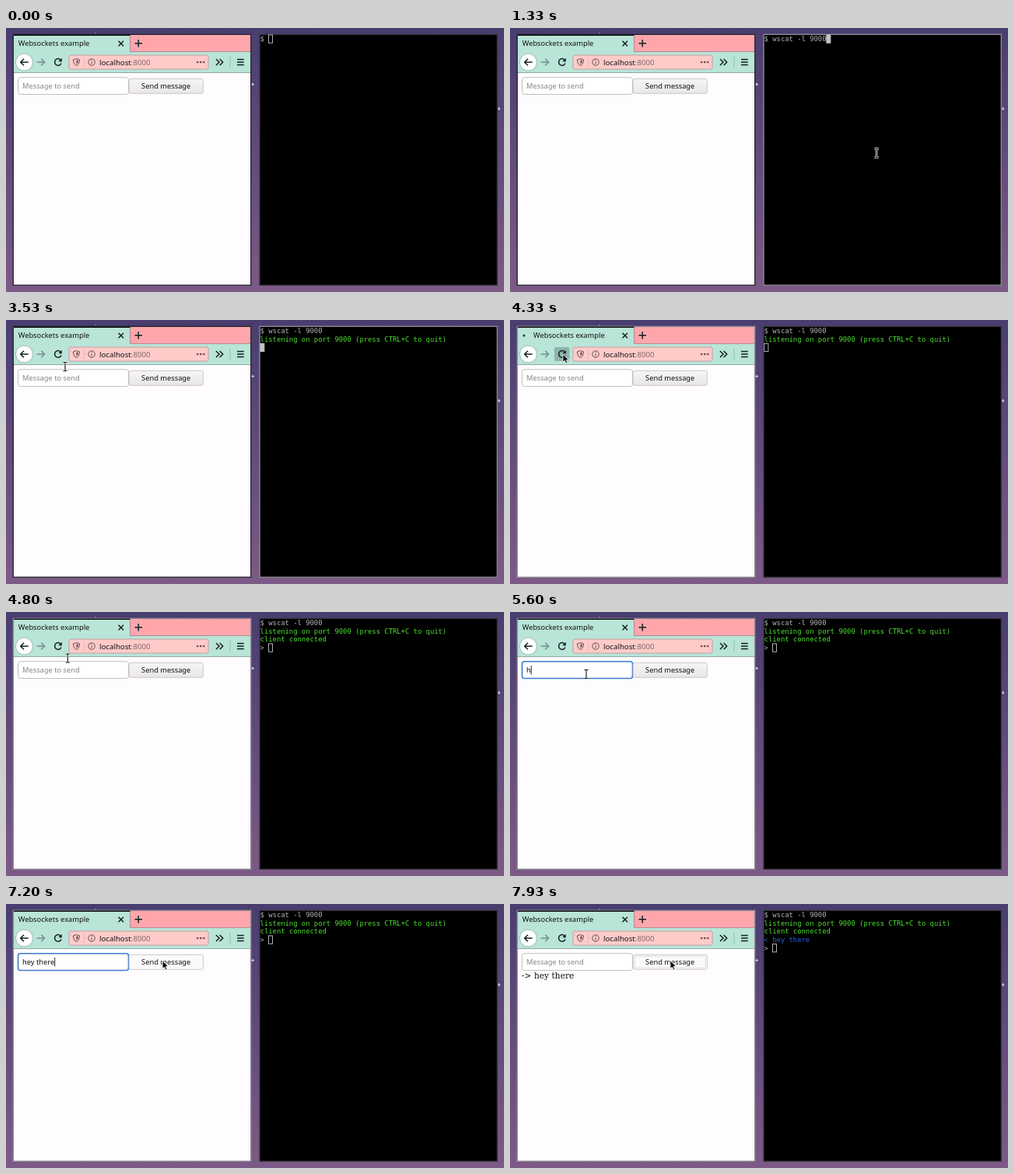
These frames come from a looping animation (640 by 340 pixels, 8 s). An HTML page:

```html
<!DOCTYPE html>
<html lang="en">
<head>
<meta charset="utf-8">
<title>Websockets example</title>
<style>
html, body { margin: 0; width: 100%; height: 100%; overflow: hidden; background: #4b3f72; }
svg { display: block; width: 640px; height: 340px; }
text { white-space: pre; font: 9.3px "Noto Sans", "Open Sans", sans-serif; fill: #111; }
.term text { font: 8.86px "DejaVu Sans Mono", monospace; fill: #b5b5b5; }
.term .green { fill: #4be02f; }
.term .blue { fill: #2462d6; }
.icon { fill: none; stroke: #15201d; stroke-width: 1.5; }
.thin { stroke: #5f4d4f; stroke-width: 1; }
</style>
</head>
<body>
<svg viewBox="0 0 640 340">
  <defs>
    <linearGradient id="sky" x2="0" y2="1"><stop stop-color="#493d70"/><stop offset="1" stop-color="#7d5a87"/></linearGradient>
    <linearGradient id="face" x2="0" y2="1"><stop stop-color="#f7f6f5"/><stop offset="1" stop-color="#e8e7e5"/></linearGradient>
  </defs>
  <rect width="640" height="340" fill="url(#sky)"/>
  <g stroke="#e9dff0" stroke-width=".9">
    <path d="M315 72.5h4M317 70.5v4M631.5 104h4M633.5 102v4"/>
    <path d="M114 6.5h2" opacity=".4"/>
  </g>

  <!-- browser -->
  <rect x="10" y="9" width="304.5" height="322" fill="#fefcff"/>
  <rect x="10" y="9" width="304.5" height="48.5" fill="#b9e4d8"/>
  <rect x="159.5" y="9" width="155" height="21.5" fill="#ffa6ad"/>
  <path d="M159.5 9V30.5H314.5" fill="none" stroke="#a98187" stroke-width=".8"/>
  <path d="M10 57.5H314.5" stroke="#8ba59e" stroke-width=".9"/>
  <rect id="frame" x="9.25" y="8.25" width="305.5" height="323" fill="none" stroke-width="1.4"/>
  <path d="M10 9.3H159.5" stroke="#111317" stroke-width="1.6"/>
  <circle id="dot" cy="20" r="1.5" fill="#1e3a34"/>
  <text id="title" y="23.4">Websockets example</text>
  <path class="icon" d="M144.5 16.7l6.5 6.5m0-6.5l-6.5 6.5M165.5 19.7h9.5M170.2 15v9.5"/>

  <circle cx="23.5" cy="44" r="11" fill="#fdfffe" stroke="#8aaba1" stroke-width=".8"/>
  <path class="icon" d="M28.7 44H19M23 39.7L18.7 44l4.3 4.3"/>
  <path class="icon" style="stroke:#72918a" d="M39.7 44h9.8M45.3 39.7l4.3 4.3l-4.3 4.3"/>
  <rect id="hover" x="57" y="35" width="19.5" height="18" rx="2" fill="#8fb4aa"/>
  <path class="icon" d="M70.3 41.2A4.3 4.3 0 1 0 71 45.4"/>
  <path d="M71.8 38.7v4.6h-4.6z" fill="#15201d"/>
  <rect x="81" y="35" width="179" height="18" rx="2" fill="#ffcbc9" stroke="#bf9a98" stroke-width=".9"/>
  <path class="icon thin" d="M90.5 39.6l3.9 1.2c.1 4-1 6.2-3.9 7.7c-2.9-1.5-4-3.7-3.9-7.7z"/>
  <path d="M90.5 41.3v5.2c1.5-1 2.2-2.3 2.3-4.5z" fill="#5f4d4f"/>
  <path d="M100.3 37.5v13" stroke="#dfaeac" stroke-width=".8"/>
  <circle class="icon thin" cx="110" cy="44" r="4.2"/>
  <path class="icon thin" d="M110 43.3v3.2M110 41.2v1.1"/>
  <text x="120" y="47.5" style="font-size:9.67px">localhost<tspan fill="#80686a">:8000</tspan></text>
  <g fill="#5f4d4f"><circle cx="246.2" cy="44" r="1.3"/><circle cx="250.2" cy="44" r="1.3"/><circle cx="254.2" cy="44" r="1.3"/></g>
  <path class="icon" d="M270 40l4 4l-4 4M274.7 40l4 4l-4 4"/>
  <path d="M288 36.5v15" stroke="#94b8ae" stroke-width=".8"/>
  <path class="icon" d="M297 40.5h8.7M297 44h8.7M297 47.5h8.7"/>

  <rect id="field" x="15.5" y="63.7" width="142" height="21.8" rx="3" fill="#fff"/>
  <text id="value" x="21" y="78.2"></text>
  <path id="caret" stroke="#111" stroke-width=".9"/>
  <rect id="button" x="158.2" y="65.3" width="95.2" height="19" rx="2.3" stroke="#c9c4bf" stroke-width=".9"/>
  <rect id="ring" x="160.2" y="67.3" width="91.2" height="15" rx="1.5" fill="none" stroke="#b5b3b1" stroke-width=".7" stroke-dasharray="1 .7"/>
  <text x="205.7" y="78.2" text-anchor="middle">Send message</text>
  <text id="log" x="15" y="95.5" style="font:10.67px 'DejaVu Serif',serif">-&gt; hey there</text>

  <!-- terminal -->
  <rect id="shell" x="326" y="8.25" width="305.3" height="323" fill="#000" stroke-width="1.4"/>
  <g class="term" id="lines"></g>
  <rect id="block" width="5.1" height="10.3" stroke="#c4c4c4" stroke-width=".9"/>

  <path id="arrow" d="M0 0V10.3L2.4 8.2L4 11.7L5.8 10.9L4.3 7.5H7.5Z" fill="#050505" stroke="#fff" stroke-width=".8"/>
  <g id="beam" fill="none">
    <path d="M-2.5-5.5H2.5M0-5.5V5.5M-2.5 5.5H2.5" stroke="#fff" stroke-width="2.6"/>
    <path d="M-2.5-5.5H2.5M0-5.5V5.5M-2.5 5.5H2.5" stroke="#111" stroke-width="1.1"/>
  </g>
</svg>
<script>
const $ = id => document.getElementById(id);
const set = (id, attrs) => { for (const k in attrs) $(id).setAttribute(k, attrs[k]); };
const show = (id, on) => set(id, { visibility: on ? "visible" : "hidden" });
const within = (t, ...spans) => spans.some(([a, b]) => t >= a && t < b);

const LOOP = 8000, CELL = 5.333, ROW = 10.667;
const RECALL = 1330, ENTER = 2200, LISTEN = 2270, RELOAD = 4200,
      CONNECT = 4600, FOCUS = 5130, CLICK = 7670, SENT = 7730;
const keyTimes = [5600, 6070, 6270, 6330, 6400, 6470, 6530, 6570, 6600];

// pointer waypoints: time, x, y
const route = [
  [330, 448, 186], [600, 471, 161], [2870, 471, 161], [3030, 415, 178], [3200, 245, 125],
  [3330, 122, 76], [3530, 76, 60], [3800, 69, 46], [4200, 68, 44], [4660, 68, 44],
  [4860, 84, 66], [5060, 98, 80], [7000, 98, 80], [7200, 201, 73], [7270, 206, 73]
];

function pointerAt(t) {
  const i = route.findIndex(p => p[0] > t);
  if (i < 0) return route[route.length - 1].slice(1);
  const [a, ax, ay] = route[i - 1], [b, bx, by] = route[i];
  const k = (t - a) / (b - a);
  return [ax + (bx - ax) * k, ay + (by - ay) * k];
}

function drawPointer(t) {
  const visible = t >= route[0][0];
  const [x, y] = visible ? pointerAt(t) : [0, 0];
  const text = x > 325 || (x < 158 && y > 57);
  show("arrow", visible && !text);
  show("beam", visible && text);
  set(text ? "beam" : "arrow", { transform: `translate(${x} ${y})` });
  show("hover", visible && within(x, [57, 77]) && within(y, [35, 53]));
  set("button", { fill: within(x, [158, 254]) && within(y, [65, 85]) ? "#fafafa" : "url(#face)" });
}

function drawBrowser(t) {
  const loading = within(t, [4270, 4730]);
  set("frame", { stroke: t >= RELOAD ? "#8d8990" : "#2b2931" });
  set("title", { x: loading ? 30 : 15.7 });
  show("dot", loading);
  set("dot", { cx: 21 - 3 * Math.cos((t - 4330) / 110) });

  const typed = "hey there".slice(0, keyTimes.filter(k => t >= k).length);
  const value = t < SENT ? typed : "";
  const active = within(t, [FOCUS, CLICK]);
  $("value").textContent = value || "Message to send";
  $("value").style.fill = value ? "#111" : "#87858a";
  set("field", { stroke: active ? "#3d7bd0" : "#c3bfc1", "stroke-width": active ? 1.6 : 1 });
  const x = 21.5 + (value ? $("value").getComputedTextLength() : 0);
  set("caret", { d: `M${x} 69v11.5` });
  show("caret", active && t < 7530);
  show("ring", t >= CLICK);
  show("log", t >= SENT);
}

function drawTerminal(t) {
  const lines = [[t < RECALL ? "$ " : "$ wscat -l 9000"]];
  if (t >= ENTER) lines.push([""]);
  if (t >= LISTEN) lines.splice(1, 1, ["listening on port 9000 (press CTRL+C to quit)", "green"], [""]);
  if (t >= CONNECT) lines.splice(2, 1, ["client connected", "green"], ["> "]);
  if (t >= SENT) lines.splice(3, 0, ["< hey there", "blue"]);
  const html = lines.map(([s, c = ""], i) =>
    `<text class="${c}" x="326.6" y="${16.9 + i * ROW}">${s.replace("<", "&lt;")}</text>`).join("");
  if (html !== drawTerminal.last) $("lines").innerHTML = drawTerminal.last = html;

  const focused = within(t, [530, RELOAD]);
  const row = lines.length - 1;
  set("shell", { stroke: focused ? "#8d8990" : "#39363d" });
  set("block", {
    x: 326.8 + lines[row][0].length * CELL, y: 8.9 + row * ROW,
    fill: focused ? "#c4c4c4" : "none"
  });
  show("block", !within(t, [1930, ENTER], [2870, 3470], [4070, RELOAD]));
}

function frame() {
  const t = performance.now() % LOOP;
  drawBrowser(t);
  drawTerminal(t);
  drawPointer(t);
  requestAnimationFrame(frame);
}
frame();
</script>
</body>
</html>
```
